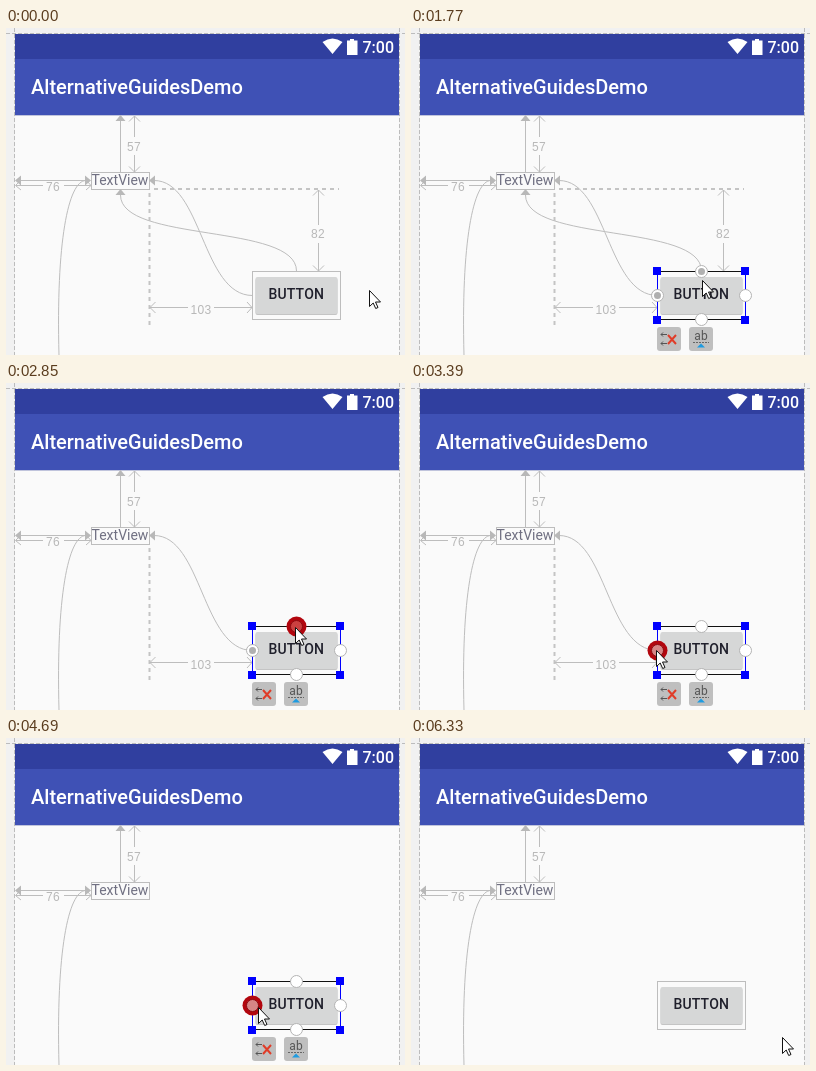
These frames come from a looping animation (399x327 px, 7260 ms). An HTML page:

```html
<!DOCTYPE html>
<html lang="en">
<head>
<meta charset="utf-8">
<title>Layout editor</title>
<style>
  html, body { margin: 0; width: 100%; height: 100%; overflow: hidden; background: #f1f1f1; }
  svg { display: block; width: 399px; height: 327px; }
  text { font-family: Roboto, sans-serif; }
  .line { fill: none; stroke: #bdbdbd; }
  .tip { fill: #b8b8b8; }
  .guide { fill: none; stroke: #c4c4c4; stroke-width: 2; stroke-dasharray: 4 4; }
  .edge { fill: none; stroke: #bcbcbc; stroke-dasharray: 4 2; }
  .num { font: 12px "Liberation Sans", Arial, sans-serif; fill: #b8b8b8; text-anchor: middle; letter-spacing: .4px; }
  .white { font-weight: 500; fill: #fff; }
  .anchor { fill: #fff; stroke: #b4b4b4; }
  .dot { fill: #b0b0b0; }
  .tool { fill: #bfbfbf; }
</style>
</head>
<body>
<svg viewBox="0 0 399 327">
  <rect x="9" width="384" y="6" height="321" fill="#fafafa"/>
  <rect x="9" width="384" y="6" height="25" fill="#303f9f"/>
  <rect x="9" width="384" y="31" height="56" fill="#3f51b5"/>
  <rect x="9" width="384" y="87" height="1" fill="#c0c4dc"/>
  <path class="edge" d="M0 5.5H399M8.5 0V327M393.5 0V327"/>

  <path fill="#fff" d="M316.5 14Q326.5 7 336.5 14L326.5 26ZM341 12.5H344V11H348V12.5H351.5V27H341Z"/>
  <text class="white" x="356.5" y="25" font-size="16">7:00</text>
  <text class="white" x="25" y="66" font-size="20">AlternativeGuidesDemo</text>

  <!-- constraints of the text view -->
  <path class="line" d="M114.5 92V144M128.5 88V109M128.5 127V144M123 93.5L128.5 88L134 93.5M123 138.5L128.5 144L134 138.5"/>
  <path class="line" d="M14 152.5H80M10 157.5H37M58 157.5H85M15 152L9.5 157.5L15 162M80 152L85 157.5L80 162"/>
  <path class="line" d="M80 152.5C62 152.5 50 215 53 327"/>
  <path class="tip" d="M114.5 87L119.5 93H109.5ZM9 152.5L15 147.5V157.5ZM85 152.5L79 147.5V157.5Z"/>
  <text class="num" x="128" y="123">57</text>
  <text class="num" x="47" y="163">76</text>

  <rect class="line" x="85.5" y="144.5" width="58" height="17"/>
  <text x="85.5" y="157" font-size="14" fill="#707082">TextView</text>

  <g class="topLink">
    <path class="guide" d="M148 161H333"/>
    <path class="line" d="M114.5 167C114.5 215 290.5 195 290.5 243M312.5 162V197M312.5 215V243M307 167.5L312.5 162L318 167.5M307 237.5L312.5 243L318 237.5"/>
    <path class="tip" d="M114.5 161L119.5 167H109.5Z"/>
    <text class="num" x="312" y="210">82</text>
  </g>
  <g class="leftLink">
    <path class="guide" d="M143.5 165V300"/>
    <path class="line" d="M148 152.5C196 152.5 196 267.5 246.5 267.5M144 279.5H182M208 279.5H246M149.5 274L144 279.5L149.5 285M241 274L246 279.5L241 285"/>
    <path class="tip" d="M143 152.5L149 147.5V157.5Z"/>
    <text class="num" x="195" y="286">103</text>
  </g>

  <g class="vertical">
    <circle class="anchor" cx="114.5" cy="140" r="5.5"/><circle class="dot" cx="114.5" cy="140" r="3.5"/>
    <circle class="anchor" cx="114.5" cy="166" r="5.5"/>
  </g>
  <g class="horizontal">
    <circle class="anchor" cx="85.5" cy="152.5" r="5.5"/><circle class="dot" cx="85.5" cy="152.5" r="3.5"/>
    <circle class="anchor" cx="143.5" cy="152.5" r="5.5"/>
  </g>

  <rect x="249.5" y="250" width="82" height="37" rx="2" fill="#c4c4c4"/>
  <rect x="249.5" y="249" width="82" height="37" rx="2" fill="#d6d7d7"/>
  <text x="290.3" y="271" font-size="14" font-weight="500" letter-spacing=".2" text-anchor="middle" fill="#20202c">BUTTON</text>
  <rect id="outline" x="246.5" y="243.5" width="88" height="48" fill="none"/>

  <g class="selected">
    <path d="M246 243.5H335M246 291.5H335" stroke="#111"/>
    <path d="M246.5 243V292M334.5 243V292" stroke="#00f"/>
    <path fill="#00f" d="M242 239h8v8h-8zM330 239h8v8h-8zM242 288h8v8h-8zM330 288h8v8h-8z"/>
    <circle class="anchor" cx="290.5" cy="243.5" r="6"/>
    <circle class="anchor" cx="246.5" cy="267.5" r="6"/>
    <circle class="anchor" cx="334.5" cy="267.5" r="6"/>
    <circle class="anchor" cx="290.5" cy="291.5" r="6"/>
    <circle class="dot topLink" cx="290.5" cy="243.5" r="3.5"/>
    <circle class="dot leftLink" cx="246.5" cy="267.5" r="3.5"/>
    <g class="hot">
      <circle r="10" fill="#b2060e"/>
      <circle id="core" r="6" stroke="#8c0a10"/>
    </g>
    <rect class="tool" x="246" y="299" width="24" height="24" rx="3"/>
    <rect class="tool" x="278" y="299" width="24" height="24" rx="3"/>
    <path fill="none" stroke="#555" d="M250 306.5H256M252 304.5L250 306.5L252 308.5M250 315.5H256M252 313.5L250 315.5L252 317.5"/>
    <path stroke="#e03c28" stroke-width="2" d="M257 307L265 316M265 307L257 316"/>
    <text x="290" y="312" font-size="12" text-anchor="middle" fill="#555">ab</text>
    <path stroke="#666" stroke-dasharray="2 1" d="M282 314.5H298"/>
    <path fill="#1e9be0" d="M290 315.5L294 319.5H286Z"/>
  </g>

  <g id="pointer">
    <circle class="press" cx=".5" cy=".5" r="11.5" fill="none" stroke="#444"/>
    <path d="M.5 .5V16.5L4.2 13L6.7 18.5L9 17.5L6.5 12H11.5Z" fill="#fff" stroke="#111"/>
  </g>
</svg>
<script>
const LOOP = 7260;
const $ = id => document.getElementById(id);
const show = (name, on) => document.querySelectorAll('.' + name)
  .forEach(el => el.style.display = on ? '' : 'none');
const within = (t, a, b) => t >= a && t < b;
const mix = (a, b, p) => a.map((v, i) => v + (b[i] - v) * p);
const ease = p => p * p * (3 - 2 * p);

// Progress in n equal jumps, the first at a and the last at b.
function jumps(t, a, b, n) {
  if (t < a) return 0;
  return Math.min(1, (Math.floor((t - a) / (b - a) * (n - 1) + .001) + 1) / n);
}

const spot = {
  start: [363, 262], dip: [325, 303], enter: [291, 245], press: [291, 253],
  top: [289, 244], left: [245, 267], away: [371, 299]
};
const presses = [[1530, 1690], [2310, 2460], [4000, 4160], [6160, 6330]];

function pointerAt(t) {
  if (t < 1530) {
    const p = jumps(t, 680, 1380, 10);
    if (p > .81) return mix(spot.enter, spot.press, (p - .8) / .2);
    const q = p / .8;
    return mix(mix(spot.start, spot.dip, q), mix(spot.dip, spot.enter, q), q);
  }
  if (t < 3000) return mix(spot.press, spot.top, ease(jumps(t, 1690, 2240, 8)));
  if (t < 4690) return mix(spot.top, spot.left, ease(Math.min(1, jumps(t, 3000, 3540, 8) / .75)));
  return mix(spot.left, spot.away, ease(jumps(t, 4690, 5150, 7)));
}

function draw(t) {
  const [x, y] = pointerAt(t).map(Math.round);
  const selected = within(t, 1690, 6330);
  const near = (ax, ay) => Math.hypot(x - ax, y - ay) < 9;
  const onTop = near(290, 243), onLeft = near(246, 267);

  $('pointer').setAttribute('transform', `translate(${x} ${y})`);
  show('press', presses.some(([a, b]) => within(t, a, b)));

  show('topLink', t < 2620);
  show('leftLink', t < 4300);
  show('vertical', within(t, 2540, 2770));
  show('horizontal', within(t, 4160, 4380));

  show('selected', selected);
  $('outline').style.display = selected ? 'none' : '';
  $('outline').setAttribute('stroke', t < 1690 && x < 335 && y < 292 ? '#4a9fd8' : '#bdbdbd');

  show('hot', onTop || onLeft);
  document.querySelector('.hot').setAttribute('transform',
    onTop ? 'translate(290.5 243.5)' : 'translate(246.5 267.5)');
  $('core').setAttribute('fill', onTop || within(t, 3690, 3770) ? '#cb4040' : '#d68686');
}

const origin = performance.now();
function tick() {
  draw((performance.now() - origin) % LOOP);
  requestAnimationFrame(tick);
}
draw(0);
requestAnimationFrame(tick);
</script>
</body>
</html>
```
